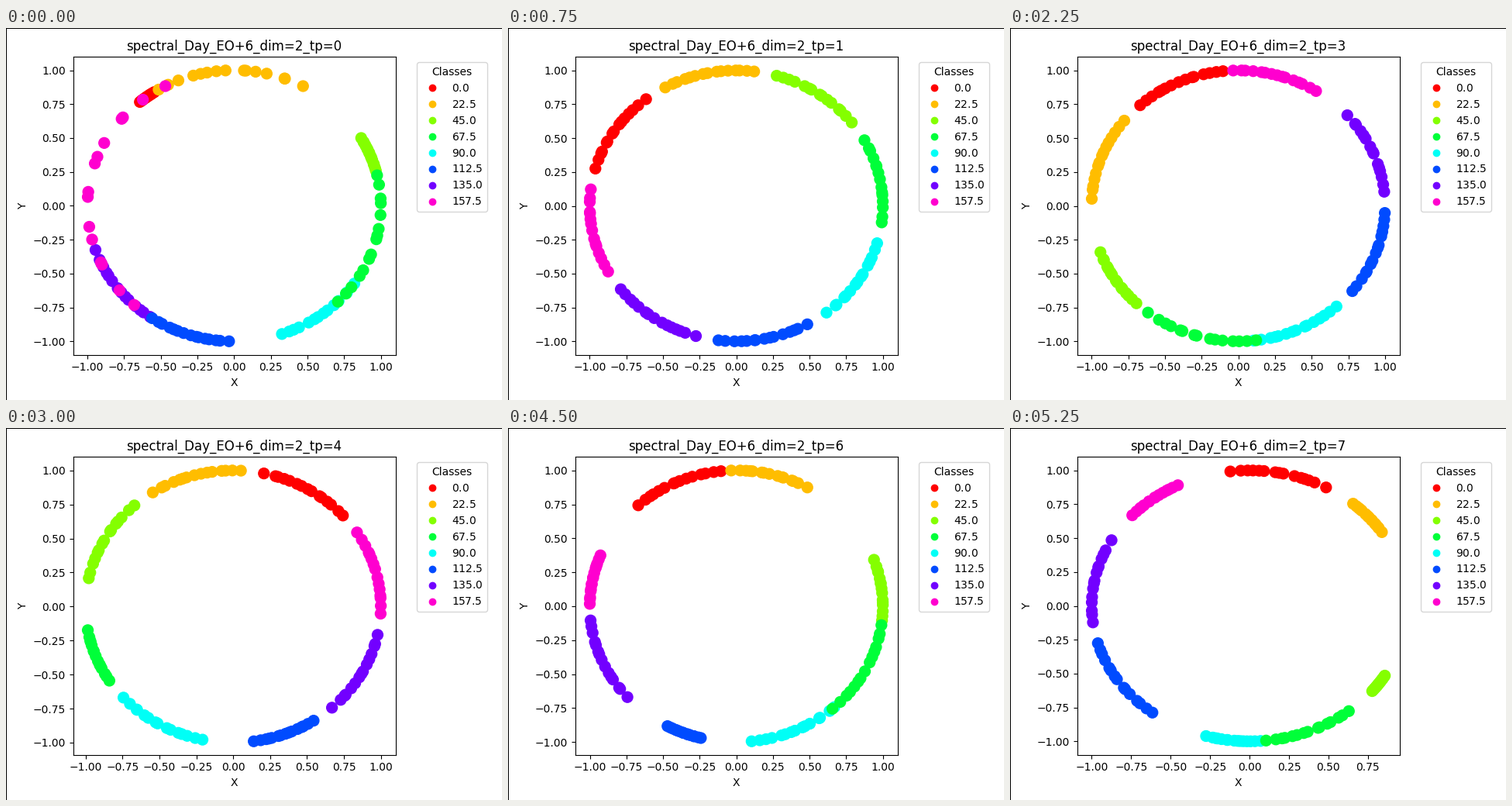
A matplotlib script for the animation above (6 s loop, 640 by 480 pixels).

```python
import numpy as np
import matplotlib.pyplot as plt
from matplotlib.animation import FuncAnimation
from matplotlib.lines import Line2D

plt.rcParams["font.family"] = "DejaVu Sans"

W, H, DPI = 640, 480, 100
STEP_MS = 750
CLASS_STEP = 22.5
DOTS_PER_CLASS = 15
HALF_ARC = 18
NAMES = ["red", "orange", "lime", "green", "cyan", "blue", "purple", "pink"]
STACK = ["cyan", "purple", "blue", "lime", "green", "red", "orange", "pink"]


def spread(rng, lo, hi, n=DOTS_PER_CLASS):
    """Jittered, evenly filled positions that reach both ends of an arc."""
    u = (np.arange(n) + rng.random(n)) / n
    u[0], u[-1] = 0, 1
    return lo + (hi - lo) * u


def pose(seed, start, turn, **arcs):
    """Classes follow each other round the circle, one eighth of a turn apart.

    start is the angle of the first class and turn the direction (1 or -1);
    arcs sets the ends, in degrees, of classes that leave the regular layout.
    """
    rng = np.random.default_rng(seed)
    angles, values = [], []
    for name in STACK:
        cls = NAMES.index(name)
        mid = start + turn * 45 * cls
        lo, hi = arcs.get(name, (mid - HALF_ARC, mid + HALF_ARC))
        angles.append(spread(rng, lo, hi))
        values.append(np.full(DOTS_PER_CLASS, cls * CLASS_STEP))
    return np.radians(np.concatenate(angles)), np.concatenate(values)


POSES = [
    pose(0, 127, -1, red=(123, 130), orange=(62, 121), lime=(15, 30),
         green=(-45, 13), blue=(-124, -92), pink=(118, 227)),
    pose(1, 146, -1),
    pose(2, 6, 1, lime=(89, 118), cyan=(160, 230), blue=(221, 249),
         purple=(252, 286)),
    pose(3, 114, 1, lime=(200, 226), green=(232, 277), pink=(58, 92)),
    pose(4, 60, 1, green=(190, 213), blue=(278, 303)),
    pose(5, -12, 1, lime=(82, 105), cyan=(143, 170), blue=(211, 226)),
    pose(6, 114, -1, orange=(61, 92), lime=(-6, 20), green=(-49, -8),
         blue=(-118, -104), pink=(158, 179)),
    pose(7, 79, -1, orange=(33, 49), lime=(-39, -31), green=(-84, -51),
         cyan=(-106, -86), pink=(117, 138)),
]

fig, ax = plt.subplots(figsize=(W / DPI, H / DPI), dpi=DPI)
ax.set_xlabel("X")
ax.set_ylabel("Y")
title = ax.set_title("")
dots = ax.scatter([0], [0], c=[0], s=100, cmap="hsv", vmin=0, vmax=180)


def limits(v, margin=0.05):
    pad = margin * np.ptp(v)
    return v.min() - pad, v.max() + pad


def show(i):
    angles, values = POSES[i]
    x, y = np.cos(angles), np.sin(angles)
    dots.set_offsets(np.column_stack([x, y]))
    dots.set_array(values)
    ax.set_xlim(*limits(x))
    ax.set_ylim(*limits(y))
    title.set_text(f"spectral_Day_EO+6_dim=2_tp={i}")
    return dots, title


show(0)
ax.legend(*dots.legend_elements(), title="Classes",
          bbox_to_anchor=(1.05, 1), loc="upper left")
fig.tight_layout()
# thin frame along the left and top edges
fig.add_artist(Line2D([0, 0, 1], [0, 1, 1], color="black", lw=72 / DPI))

anim = FuncAnimation(fig, show, frames=len(POSES), init_func=lambda: show(0),
                     interval=STEP_MS, repeat=True, repeat_delay=0, blit=False)
plt.show()
```
